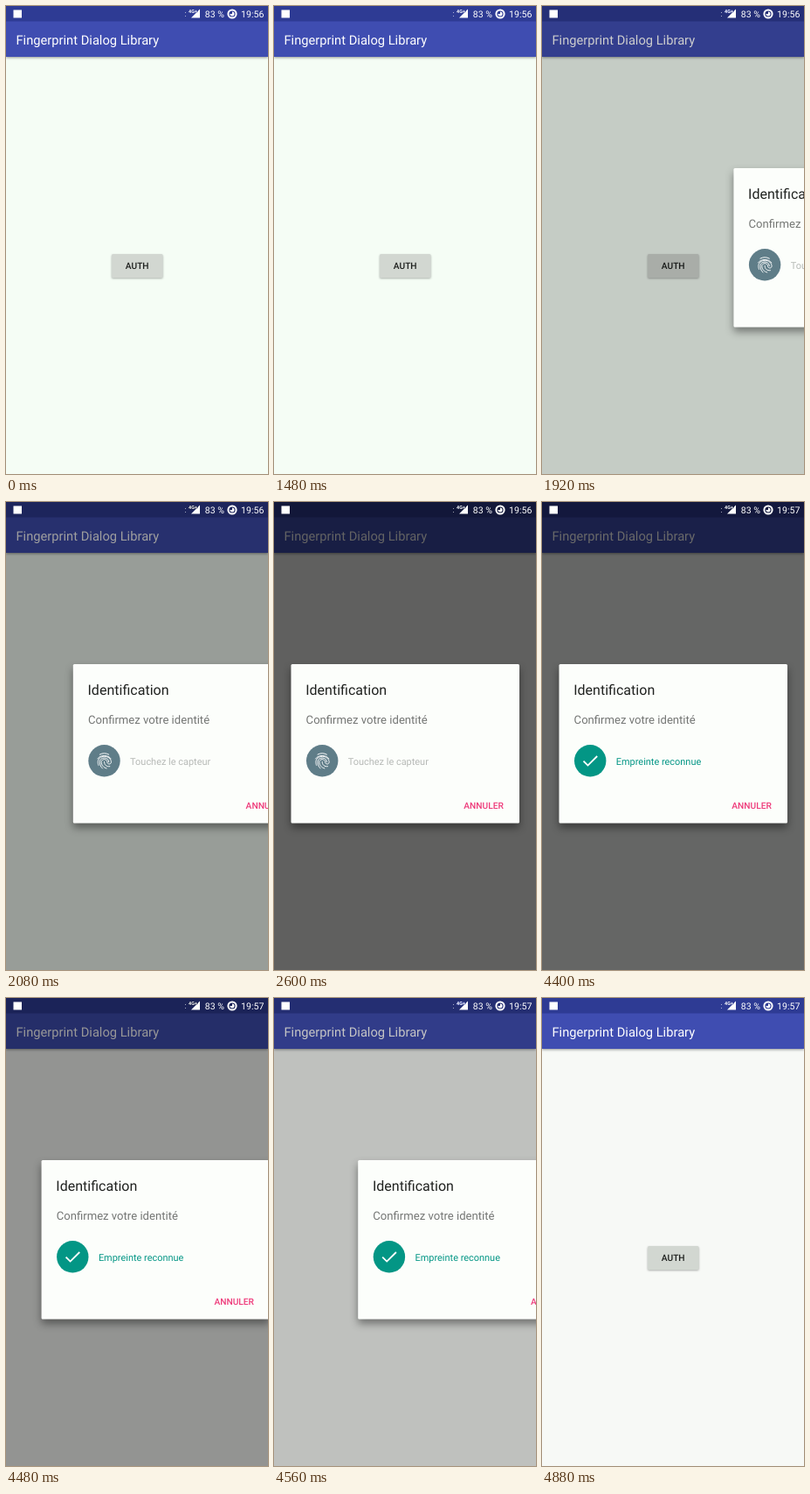
An HTML page that plays this animation: 300 by 534 pixels, repeating every 4920 ms.

```html
<!DOCTYPE html>
<html lang="fr">
<head>
<meta charset="utf-8">
<title>Fingerprint Dialog Library</title>
<style>
  html, body { margin: 0; width: 100%; height: 100%; overflow: hidden; background: #f5fdf5; }
  svg { display: block; width: 100%; height: 100%; }
  text { font-family: Roboto, sans-serif; text-rendering: geometricPrecision; }
  .medium { font-weight: 500; }
  #bar { filter: drop-shadow(0 1px 1.5px rgba(0, 0, 0, .4)); }
  #button { filter: drop-shadow(0 1px .8px rgba(0, 0, 0, .3)); }
  #card { filter: drop-shadow(0 5px 5px rgba(0, 0, 0, .42)); }
  .line { fill: none; stroke: #fff; stroke-linecap: round; }
</style>
</head>
<body>
<svg viewBox="0 0 300 534">
  <rect id="page" width="300" height="534"/>
  <rect id="bar" y="17" width="300" height="41" fill="#3f4db1"/>
  <rect width="300" height="17.5" fill="#2e3b94"/>
  <text x="11.5" y="44" font-size="14.7" fill="#fff">Fingerprint Dialog Library</text>
  <rect id="button" x="121" y="283" width="58.5" height="27" rx="1.5" fill="#d2d7d1"/>
  <text class="medium" x="136.8" y="300" font-size="10.2" fill="#1c1e1c">AUTH</text>

  <rect id="dim" width="300" height="534"/>

  <g id="dialog">
    <rect id="card" x="19.5" y="185" width="261.5" height="181.5" rx="1.5" fill="#fcfefb"/>
    <text x="36.2" y="220" font-size="16.04" fill="#202220">Identification</text>
    <text x="36.6" y="253" font-size="13.12" fill="#747674">Confirmez votre identité</text>
    <circle id="badge" cx="55.2" cy="295.3" r="18.2"/>
    <g id="finger" class="line" stroke-width="1.05" transform="translate(44.4 284.6) scale(.9)">
      <path d="M6.2 3.9a12 12 0 0 1 11.6 0"/>
      <path d="M3.5 9.2c3.5-5.2 13.5-5.2 17 0"/>
      <path d="M14.9 21.5c-4-1-6.6-4.2-6.6-8.1 0-1.8 1.7-3.3 3.7-3.3s3.8 1.5 3.8 3.3 1.5 2.6 2.6 2.6 2.4-.9 2.4-2.4c0-4.2-3.9-7.3-8.6-7.3-4.6 0-8.3 3-8.3 7.2 0 .8.1 2.3.7 4"/>
      <path d="M9.7 21.5c-2-2-3.5-4.2-3.5-8.1 0-2.9 2.6-5.2 5.8-5.2s5.8 2.3 5.8 5.2"/>
      <path d="M12 13.2c0 3.8 2.6 6.4 7 5.8"/>
    </g>
    <path id="check" class="line" stroke-width="1.8" style="stroke-linecap:butt" d="M47.5 295.6l5 5 10.700-10.600"/>
    <text id="status" x="84.8" y="299.700" font-size="10.94"></text>
    <text class="medium" x="217.300" y="350" font-size="10.2" fill="#ee3a7a">ANNULER</text>
  </g>

  <g fill="#fff">
    <rect x="8.5" y="4.500" width="9.500" height="9"/>
    <path d="M205 7h1v1h-1zM205 11h1v1h-1z" opacity=".6"/>
    <path d="M222 3.500V13.500H212z"/>
    <text x="209" y="8" font-size="5.500" font-weight="700" stroke="#2e3b94" stroke-width="1" paint-order="stroke" id="net">4G+</text>
    <text x="227.800" y="13" font-size="10.5">83 %</text>
    <circle class="line" cx="259" cy="9" r="4.600" stroke-width="2"/>
    <path d="M259 6.500a2.500 2.500 0 1 1-2.500 2.500h2.500z"/>
    <text id="clock" x="269" y="13" font-size="10.6"></text>
  </g>
</svg>
<script>
  const LOOP = 4920, STEP = 40, WIDTH = 300;
  const AUTH_TIME = 3080;
  const el = id => document.getElementById(id);
  const progress = (t, start, length) => Math.min(1, Math.max(0, (t - start) / length));
  const ease = p => (1 - Math.cos(Math.PI * p)) / 2;
  const show = (id, on) => el(id).setAttribute('visibility', on ? 'inherit' : 'hidden');

  function render(t) {
    const entered = ease(progress(t, 1724, 500));
    const left = ease(progress(t, 4398, 480));
    const dim = progress(t, 1750, 530) - progress(t, 4390, 270);
    const known = t >= AUTH_TIME;

    el('page').setAttribute('fill', t < 2320 ? '#f5fdf5' : '#f7f9f6');
    el('dim').setAttribute('opacity', 0.61 * dim);
    el('dialog').setAttribute('transform', `translate(${WIDTH * (1 - entered + left)} 0)`);
    show('dialog', entered > 0 && left < 1);
    show('finger', !known);
    show('check', known);
    el('badge').setAttribute('fill', known ? '#039685' : '#5f7d88');
    el('status').setAttribute('fill', known ? '#039685' : '#b6b9b6');
    el('status').textContent = known ? 'Empreinte reconnue' : 'Touchez le capteur';
    el('clock').textContent = known ? '19:57' : '19:56';
    el('net').setAttribute('stroke', dim > 0.5 ? '#131a40' : '#2e3b94');
  }

  const begin = performance.now();
  function tick() {
    const t = (performance.now() - begin) % LOOP;
    render(Math.floor(t / STEP) * STEP);
    requestAnimationFrame(tick);
  }
  render(0);
  requestAnimationFrame(tick);
</script>
</body>
</html>
```
